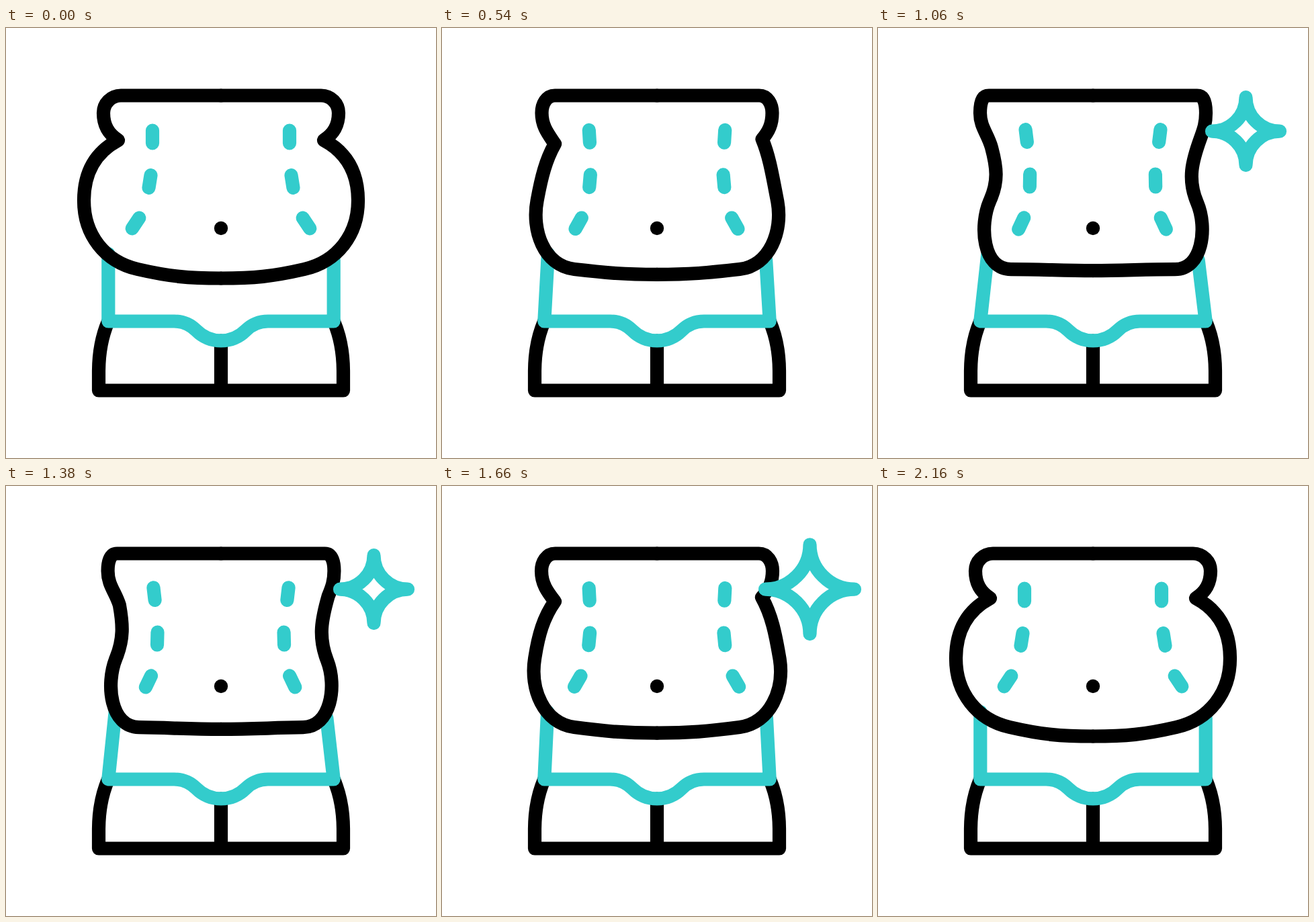
Recreate the animation shown at these times as an HTML page. Size 640 by 640 pixels, loop 2.4 s.

```html
<!DOCTYPE html>
<html lang="en">
<head>
<meta charset="utf-8">
<title>Waist</title>
<style>
  html, body { margin: 0; width: 100%; height: 100%; overflow: hidden; background: #fff; }
  svg { display: block; width: 100%; height: 100%; }
  path { fill: none; stroke: #000; stroke-width: 20.2; stroke-linecap: round; stroke-linejoin: round; }
  .teal { stroke: #3cc; }
</style>
</head>
<body>
<svg viewBox="0 0 640 640">
  <path d="M152 437C143 458 138 485 138 512V539.5H502V512C502 485 497 458 488 437M320 465.5V539.5"/>
  <path id="shorts" class="teal"/>
  <path id="right"/>
  <path id="left" transform="matrix(-1 0 0 1 640 0)"/>
  <circle cx="320" cy="298" r="10.2"/>
  <path id="marks" class="teal"/>
  <path id="star" class="teal" transform="translate(547.5 153.7)"/>
</svg>
<script>
const LOOP = 2400;
const set = (id, d) => document.getElementById(id).setAttribute('d', d);
const lerp = (a, b, p) => a + (b - a) * p;
const span = (t, a, b) => Math.min(1, Math.max(0, (t - a) / (b - a)));
const smooth = x => x * x * (3 - 2 * x);
const polar = (x, y, deg, r) => {
  const a = deg * Math.PI / 180;
  return [x + r * Math.cos(a), y + r * Math.sin(a)];
};

// Symmetric cubic-bezier(k, 0, 1 - k, 1), solved by bisection
function ease(x, k = 0.7) {
  let lo = 0, hi = 1;
  for (let i = 0; i < 24; i++) {
    const s = (lo + hi) / 2, r = 1 - s;
    if (3 * r * r * s * k + 3 * r * s * s * (1 - k) + s ** 3 < x) lo = s; else hi = s;
  }
  return smooth(lo);
}

// Half outline from the top corner down to the middle of the belly.
// A node is x, y, heading in, heading out; handles are a fixed share of the chord.
function outline(nodes) {
  const pts = nodes[0].slice(0, 2);
  for (let i = 1; i < nodes.length; i++) {
    const [x, y, a, out = a] = nodes[i - 1], [u, v, into] = nodes[i];
    const r = 0.39 * Math.hypot(u - x, v - y);
    pts.push(...polar(x, y, out, r), ...polar(u, v, into, -r), u, v);
  }
  return pts;
}
const slim = (neck, waist) => outline(
  [[475, 100.5, 0], [488, 126.5, 90], neck, waist, [442, 359.2, 180], [320, 361.2, 180]]);

const wide = outline([[469, 100.5, 0], [495, 126.5, 90], [473, 167, 147, 28],
  [524, 257, 90], [444, 359, 167], [320, 372.5, 180]]);
const slimRight = slim([480, 164, 110], [475, 260, 67]);
const slimLeft = slim([471, 178, 105], [473, 256, 66]);

function half(slimPts, p) {
  const pts = wide.map((v, i) => lerp(v, slimPts[i], p));
  return `M320 100.5L${pts.slice(0, 2)}C${pts.slice(2)}`;
}

// Centre and tilt of each dash on the left
const wideMarks = [[218, 162, 90], [214, 228.5, 99], [193, 290.5, 124]];
const slimMarks = [[220.7, 160.5, 83], [226, 227, 91], [213.2, 291, 115]];

function dash(x, y, deg) {
  return `M${polar(x, y, deg, -9.4)}L${polar(x, y, deg, 9.4)}`;
}

function marks(p) {
  return wideMarks.map((mark, i) => {
    const [x, y, deg] = mark.map((v, j) => lerp(v, slimMarks[i][j], p));
    return dash(x, y, deg) + dash(640 - x - i * p, y, 180 - deg);
  }).join('');
}

function shorts(p) {
  return `M${lerp(152.3, 163.4, p)} 336L152.3 436.5H250a47 47 0 0 1 33.2 13.7` +
    `a52 52 0 0 0 73.6 0a47 47 0 0 1 33.2 -13.7H487.7L${lerp(487.7, 476.6, p)} 345`;
}

function starRadius(t) {
  const peak = 67, rest = 50.5;
  if (t < 830) return peak * smooth(span(t, 560, 830));
  if (t < 1420) return lerp(peak, rest, smooth(span(t, 830, 1060)));
  if (t < 1690) return lerp(rest, peak, smooth(span(t, 1420, 1690)));
  return peak * (1 - smooth(span(t, 1690, 1960)));
}

function star(r) {
  if (r < 0.1) return '';
  const arc = `A${r} ${r} 0 0 0 `;
  return `M0 ${-r}${arc}${r} 0${arc}0 ${r}${arc}${-r} 0${arc}0 ${-r}Z`;
}

function draw(t) {
  const p = ease(span(t, 0, 1080)) - ease(span(t, 1120, 2160));
  set('right', half(slimRight, p));
  set('left', half(slimLeft, p));
  set('marks', marks(p));
  set('shorts', shorts(p));
  set('star', star(starRadius(t)));
}

const start = performance.now();
function tick() {
  draw((performance.now() - start) % LOOP);
  requestAnimationFrame(tick);
}
tick();
</script>
</body>
</html>
```
